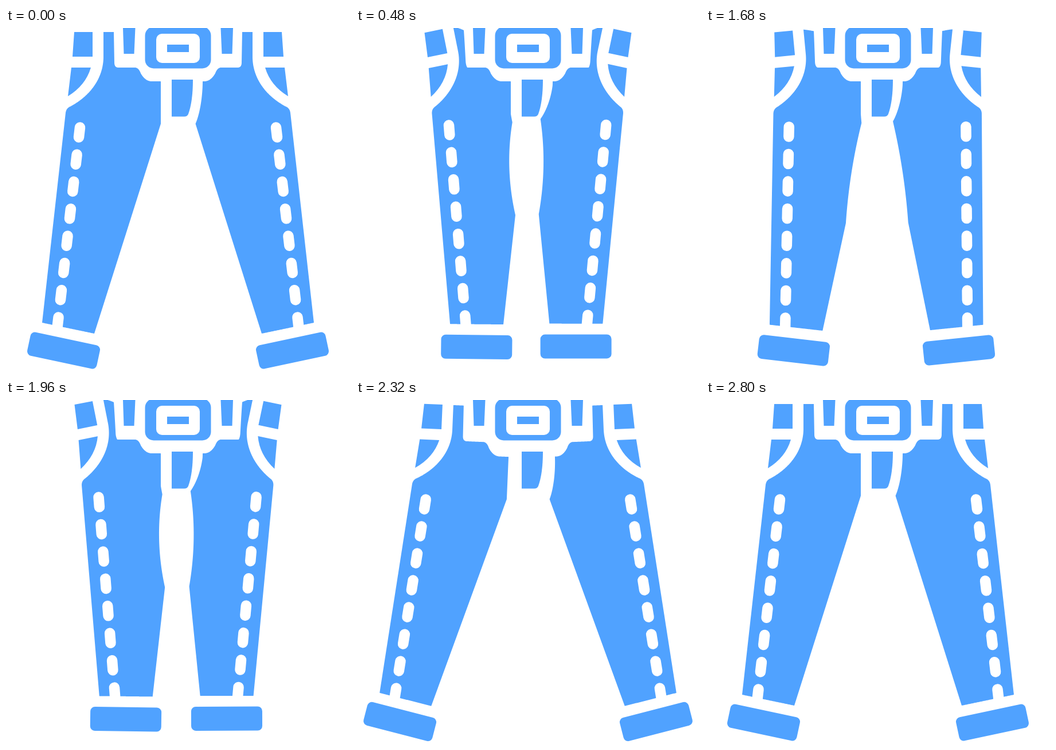
An HTML page with a canvas for the animation above (3.24 s loop, 600 px wide and 600 px high).

```html
<!DOCTYPE html>
<html>
<head>
<meta charset="utf-8">
<style>
  html, body { margin: 0; width: 100%; height: 100%; overflow: hidden; background: #fff; }
  canvas { display: block; }
</style>
</head>
<body>
<canvas id="stage" width="600" height="600"></canvas>
<script>
const ctx = document.getElementById('stage').getContext('2d');
const BLUE = '#50a2ff', WHITE = '#fff';
const LOOP = 3240, STEP = 40;
const HIP = { x: 125, y: 5 };

// Key poses: [time in ms, leg angle in radians], positive closes the legs
const swing = [
  [0, 0], [430, 0.203], [800, 0.0915], [1655, 0.0915], [1940, 0.198],
  [2200, -0.0145], [2320, -0.043], [2420, -0.061], [2800, 0], [LOOP, 0]
];

const clamp = v => Math.max(0, Math.min(1, v));

const secant = i => swing[i] && swing[i + 1]
  ? (swing[i + 1][1] - swing[i][1]) / (swing[i + 1][0] - swing[i][0]) : 0;

// Slopes for a smooth curve that never overshoots its keys
function slope(i) {
  const a = secant(i - 1), b = secant(i);
  return a * b > 0 ? 2 * a * b / (a + b) : 0;
}

function angleAt(t) {
  let i = 0;
  while (t >= swing[i + 1][0]) i++;
  const [t0, a] = swing[i], [t1, b] = swing[i + 1];
  const d = t1 - t0, u = (t - t0) / d, v = 1 - u;
  return a * v * v * (1 + 2 * u) + b * u * u * (3 - 2 * u)
    + d * u * v * (v * slope(i) - u * slope(i + 1));
}

function samplePath(d) {
  const path = document.createElementNS('http://www.w3.org/2000/svg', 'path');
  path.setAttribute('d', d);
  const count = Math.ceil(path.getTotalLength());
  return Array.from({ length: count }, (_, i) => path.getPointAtLength(i));
}

// Both legs share one silhouette; only the edge beside the fly differs
const legOutline = fly => samplePath(
  'M170 7H188L189 60Q189 69 196 69H223Q231 68 235 79Q243 93 254 93' + fly +
  'L154 533L63 514L104 148Q105 140 112 137C146 119 170 88 170 50Z');

// The cloth below "pin" follows the leg fully after "reach" more pixels
const leftLeg = { outline: legOutline('H270V167'), pin: 150, reach: 200 };
const rightLeg = { outline: legOutline('H257C257 120 262 150 269.5 167'), pin: 100, reach: 250 };

const pockets = new Path2D(
  'M119 7H151V50H116Z M114 69H148Q139 100 108 119Z');
const beltLoop = new Path2D('M204 0H225.5L223.5 45H205.5Z');
const flap = new Path2D('M289 90H326Q326 128 318 150Q316 154.5 311 154.5H289Z');

function box(x, y, w, h, r, color) {
  ctx.fillStyle = color;
  ctx.beginPath();
  ctx.roundRect(x, y, w, h, r);
  ctx.fill();
}

// Rotates a point about the hip; when closing, the waist and crotch hold back
function bend({ x, y }, angle, { pin, reach }) {
  const follow = Math.max(clamp((194 - x) / 24), clamp((y - pin) / reach));
  const a = angle > 0 ? angle * follow : angle;
  const c = Math.cos(a), s = Math.sin(a), dx = x - HIP.x, dy = y - HIP.y;
  return [HIP.x + c * dx + s * dy, HIP.y + c * dy - s * dx];
}

function drawStitches() {
  ctx.strokeStyle = WHITE;
  ctx.lineWidth = 18.5;
  ctx.lineCap = 'round';
  ctx.beginPath();
  for (let i = 0; i < 8; i++) {
    const x = 128 - i * 5.35, y = 182 + i * 47.3;
    ctx.moveTo(x + 1, y - 8.5);
    ctx.lineTo(x - 1, y + 8.5);
  }
  ctx.stroke();
}

function drawLeg(angle, leg) {
  ctx.fillStyle = BLUE;
  ctx.beginPath();
  for (const point of leg.outline) ctx.lineTo(...bend(point, angle, leg));
  ctx.fill();

  ctx.save();
  ctx.translate(HIP.x, HIP.y);
  ctx.rotate(-angle);
  ctx.translate(-HIP.x, -HIP.y);
  ctx.fill(pockets);
  drawStitches();
  ctx.translate(100.5, 562.5);
  ctx.rotate(Math.PI / 15);
  box(-62, -21, 124, 42, 8, BLUE);
  ctx.restore();
}

function drawSide(angle, leg) {
  drawLeg(angle, leg);
  ctx.fill(beltLoop);
}

function drawBuckle() {
  ctx.fillStyle = BLUE;
  ctx.fill(flap);
  box(242.5, -2, 115, 72.5, 15, BLUE);
  box(262, 10, 76, 51, 10, WHITE);
  box(281, 29, 38, 13, 0, BLUE);
}

function draw(t) {
  const angle = angleAt(t);
  ctx.fillStyle = WHITE;
  ctx.fillRect(0, 0, 600, 600);
  drawSide(angle, leftLeg);

  // The right side is mirrored and closes slightly further
  ctx.save();
  ctx.translate(600, 0);
  ctx.scale(-1, 1);
  drawSide(angle + 0.011 * clamp(angle / 0.09), rightLeg);
  ctx.restore();

  drawBuckle();
}

const start = performance.now();
function tick() {
  const t = (performance.now() - start) % LOOP;
  draw(Math.floor(t / STEP) * STEP);
  requestAnimationFrame(tick);
}
tick();
</script>
</body>
</html>
```
